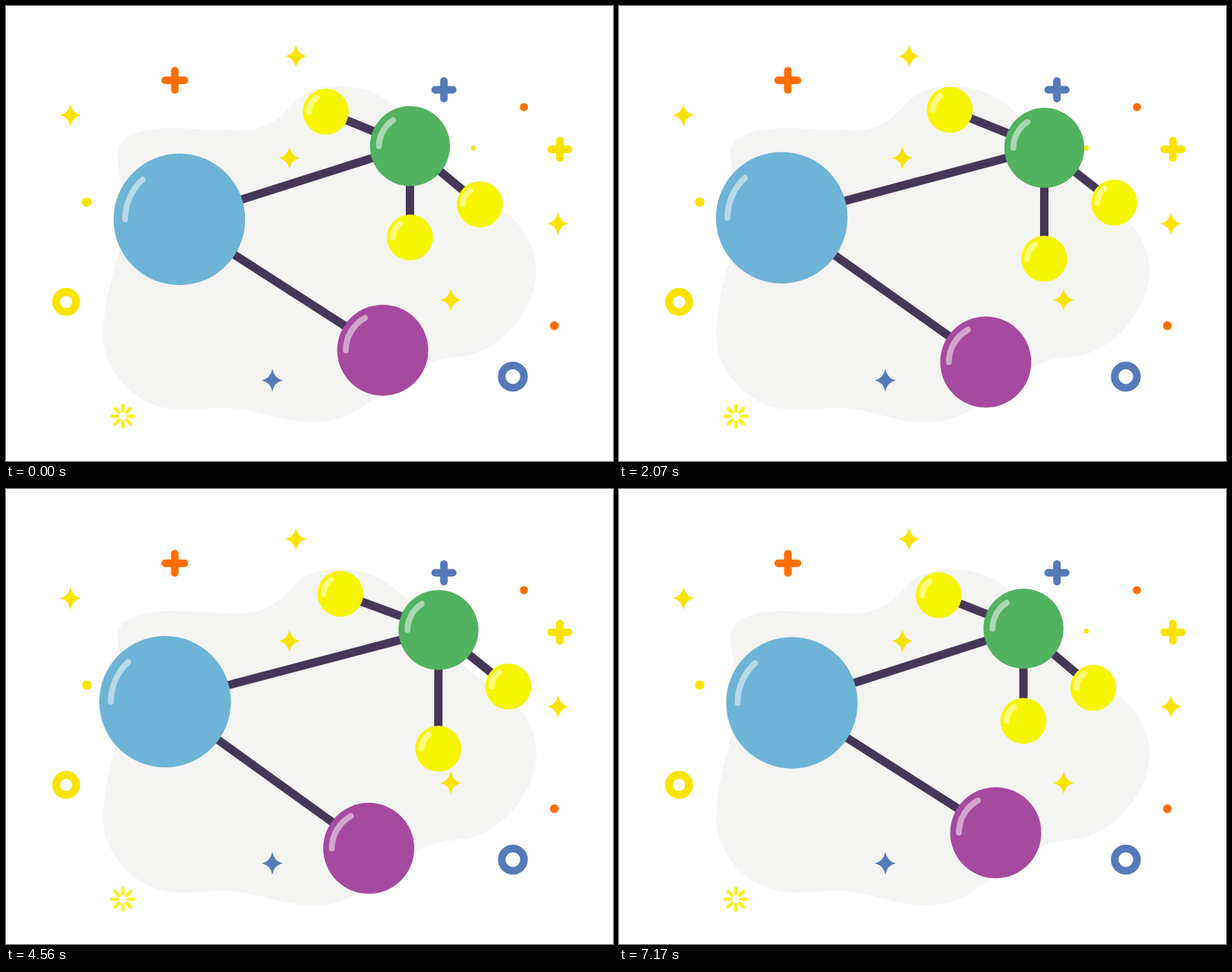
An HTML page with a canvas for the animation above (7200 ms loop, 800x600 px).

```html
<!DOCTYPE html>
<html lang="en">
<head>
<meta charset="utf-8">
<title>Molecule</title>
<style>
html, body { margin: 0; width: 100%; height: 100%; overflow: hidden; background: #fff; }
canvas { display: block; }
</style>
</head>
<body>
<canvas id="stage" width="800" height="600"></canvas>
<script>
const ctx = document.getElementById('stage').getContext('2d');
const TAU = Math.PI * 2;
const LOOP = 7200, STEP = 30, LEG = 900;
const YELLOW = '#fbe300', ORANGE = '#ff6f00', BLUE = '#567ab8', BALL_YELLOW = '#f7f600';

const blob = new Path2D(
  'M147 194C147 170 180 161 217 161C250 161 275 164 305 164' +
  'C352 164 363 143 383 124C400 109 420 106 438 106C493 106 522 135 550 172' +
  'C575 208 600 235 640 260C675 280 699 310 699 350C699 400 650 458 600 462' +
  'C560 465 545 475 520 490C490 510 462 549 405 549C360 549 330 530 290 530' +
  'C265 530 250 532 230 532C170 532 128 480 128 434C128 400 138 360 150 322' +
  'C165 270 147 225 147 194Z');

// Each ball visits home, b and c in turn; shine is [radius, end angle in degrees].
const balls = {
  blue:   { x: 228.5, y: 281.3, r: 86.7, color: '#6eb4d6', b: [-20, 20],  c: [-20, 0],  shine: [71.5, 227] },
  green:  { x: 532.4, y: 184.8, r: 52.7, color: '#51b25f', b: [20, -20],  c: [40, 0],   shine: [40.8, 237] },
  purple: { x: 496.5, y: 453.9, r: 60,   color: '#a64a9f', b: [0, -20],   c: [-20, 20], shine: [48.6, 241] },
  top:    { x: 421.5, y: 139.4, r: 30.3, color: BALL_YELLOW, b: [0, 20],  c: [20, 0],   shine: [22.2, 236] },
  right:  { x: 624.5, y: 261.5, r: 30.3, color: BALL_YELLOW, b: [20, 20], c: [40, 0],   shine: [22.2, 236] },
  bottom: { x: 532.4, y: 305.2, r: 30.3, color: BALL_YELLOW, b: [20, 20], c: [40, 40],  shine: [22.2, 236] }
};
const bonds = [['blue', 'green'], ['blue', 'purple'], ['green', 'top'], ['green', 'right'], ['green', 'bottom']];

function bezier(p, t) {
  const u = 1 - t;
  return [0, 1].map(i =>
    u * u * u * p[0][i] + 3 * u * u * t * p[1][i] + 3 * u * t * t * p[2][i] + t * t * t * p[3][i]);
}

// Samples a curve so that it can be read at constant speed.
function measure(p) {
  const pts = [p[0]], len = [0];
  for (let i = 1; i <= 100; i++) {
    const q = bezier(p, i / 100), o = pts[i - 1];
    pts.push(q);
    len.push(len[i - 1] + Math.hypot(q[0] - o[0], q[1] - o[1]));
  }
  return { pts, len };
}

function buildPath({ b, c }) {
  const a = [0, 0], keys = [a, b, c, a, b, c, a, b, a];
  const slope = i => {
    const prev = keys[Math.max(i - 1, 0)], next = keys[Math.min(i + 1, keys.length - 1)];
    return [(next[0] - prev[0]) / 6, (next[1] - prev[1]) / 6];
  };
  return keys.slice(1).map((end, i) => {
    const start = keys[i], out = slope(i), into = slope(i + 1);
    return measure([start, [start[0] + out[0], start[1] + out[1]],
      [end[0] - into[0], end[1] - into[1]], end]);
  });
}

function along({ pts, len }, f) {
  const d = f * len[len.length - 1];
  let i = 1;
  while (i < len.length - 1 && len[i] < d) i++;
  const k = (d - len[i - 1]) / (len[i] - len[i - 1] || 1);
  return [0, 1].map(j => pts[i - 1][j] + (pts[i][j] - pts[i - 1][j]) * k);
}

for (const ball of Object.values(balls)) ball.path = buildPath(ball);

function stroke(color, width, cap = 'round') {
  ctx.strokeStyle = color;
  ctx.lineWidth = width;
  ctx.lineCap = cap;
  ctx.stroke();
}

function line(x1, y1, x2, y2) {
  ctx.moveTo(x1, y1);
  ctx.lineTo(x2, y2);
}

function disc(x, y, r, color) {
  ctx.beginPath();
  ctx.arc(x, y, r, 0, TAU);
  ctx.fillStyle = color;
  ctx.fill();
}

function ring(x, y, r, width, color) {
  ctx.beginPath();
  ctx.arc(x, y, r, 0, TAU);
  stroke(color, width);
}

function plus(x, y, size, color) {
  const h = size - 5;
  ctx.beginPath();
  line(x - h, y, x + h, y);
  line(x, y - h, x, y + h);
  stroke(color, 10);
}

function star(x, y, color) {
  const w = 13.8, h = 15, k = 2.5;
  ctx.beginPath();
  ctx.moveTo(x, y - h);
  ctx.quadraticCurveTo(x + k, y - k, x + w, y);
  ctx.quadraticCurveTo(x + k, y + k, x, y + h);
  ctx.quadraticCurveTo(x - k, y + k, x - w, y);
  ctx.quadraticCurveTo(x - k, y - k, x, y - h);
  ctx.fillStyle = color;
  ctx.fill();
}

function burst(x, y) {
  ctx.beginPath();
  for (let i = 0; i < 8; i++) {
    const c = Math.cos(i * TAU / 8), s = Math.sin(i * TAU / 8);
    line(x + 7.2 * c, y + 7.2 * s, x + 14.2 * c, y + 14.2 * s);
  }
  stroke('#fcee21', 4.6);
}

function drawScenery() {
  ctx.fillStyle = '#fff';
  ctx.fillRect(0, 0, 800, 600);
  ctx.fillStyle = '#f4f4f3';
  ctx.fill(blob);

  plus(222.5, 98, 17.7, ORANGE);
  plus(577.2, 110.5, 16.6, BLUE);
  plus(730, 189, 16.5, YELLOW);
  for (const [x, y] of [[85, 144], [382.2, 66.2], [373.5, 200.5], [586.2, 387.5], [727.5, 287]]) star(x, y, YELLOW);
  star(351, 493.5, BLUE);
  disc(682.6, 133.3, 5.4, ORANGE);
  disc(722.7, 421.6, 5.8, ORANGE);
  disc(106.4, 258.6, 6.2, YELLOW);
  disc(616, 187.5, 3.2, YELLOW);
  ring(79.2, 390.2, 13.2, 10.3, YELLOW);
  ring(668, 488.7, 14.7, 10, BLUE);
  burst(154, 541);
}

function drawBall({ r, color, shine: [radius, angle] }, [x, y]) {
  disc(x, y, r, color);
  ctx.beginPath();
  ctx.arc(x, y, radius, Math.PI, angle * Math.PI / 180);
  stroke('rgba(255,255,255,0.5)', 7.8);
}

function draw(time) {
  const t = Math.floor((time % LOOP) / STEP) * STEP;
  const leg = Math.floor(t / LEG), f = (t % LEG) / LEG;
  const at = {};
  for (const [name, ball] of Object.entries(balls)) {
    const [dx, dy] = along(ball.path[leg], f);
    at[name] = [ball.x + dx, ball.y + dy];
  }
  drawScenery();
  for (const [a, b] of bonds) {
    ctx.beginPath();
    line(...at[a], ...at[b]);
    stroke('#453758', 11, 'butt');
  }
  for (const name in balls) drawBall(balls[name], at[name]);
}

const begin = performance.now();
function tick() {
  draw(performance.now() - begin);
  requestAnimationFrame(tick);
}
tick();
</script>
</body>
</html>
```
